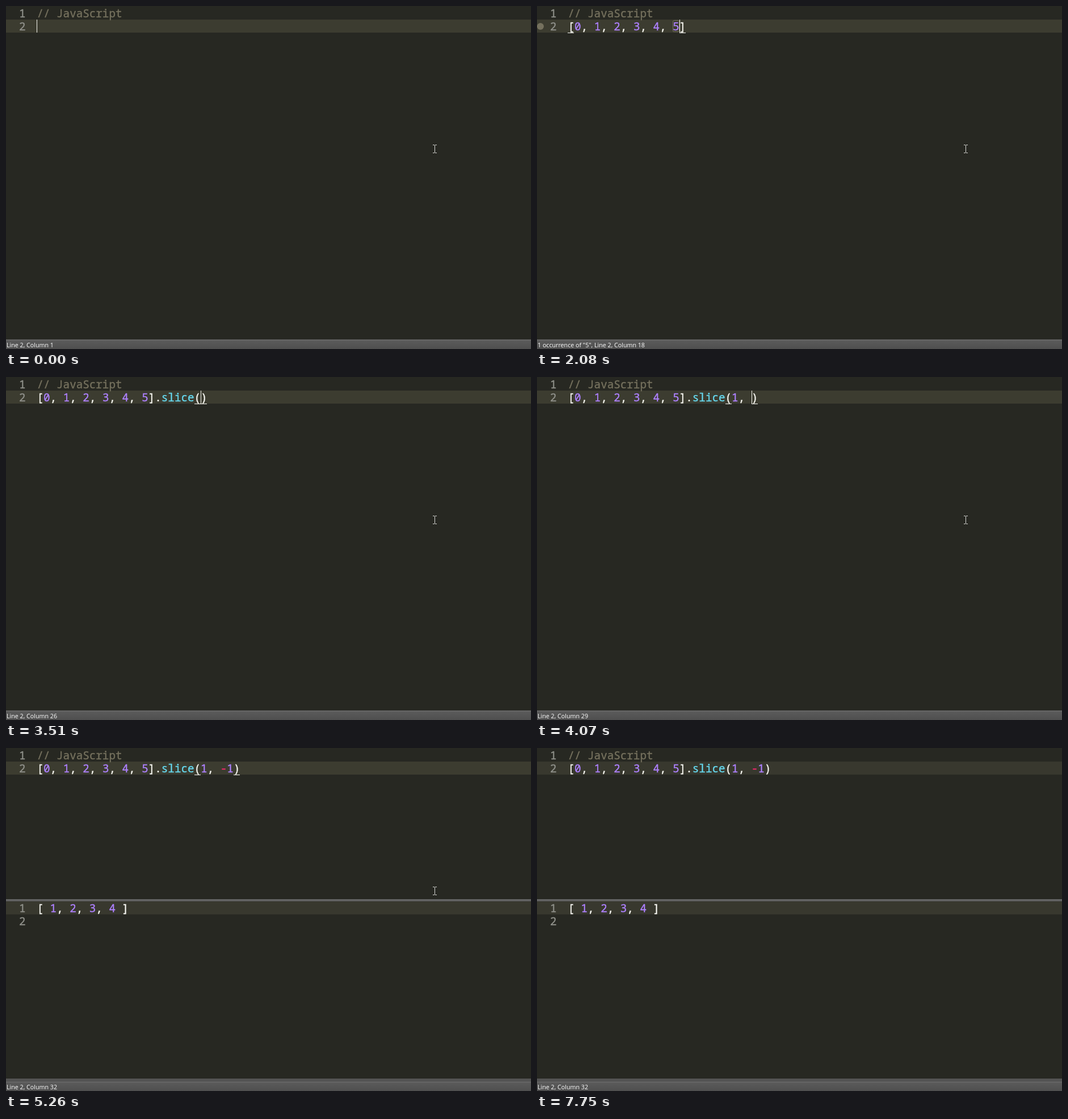
These frames come from a looping animation (925x606 px, 7810 ms). An HTML page with a canvas:

```html
<!DOCTYPE html>
<html lang="en">
<head>
<meta charset="utf-8">
<title>Array slice</title>
<style>
html, body { margin: 0; width: 100%; height: 100%; overflow: hidden; background: #272822; }
canvas { display: block; }
</style>
</head>
<body>
<canvas id="stage" width="925" height="606"></canvas>
<script>
const ctx = document.getElementById("stage").getContext("2d");
const LOOP = 7810;
const W = 925, LEFT = 54.45, CELL = 11.545, ROW = 23;
const CODE_FONT = '19.24px "Noto Sans Mono", monospace';
const STATUS_FONT = '10.7px "Open Sans", sans-serif';
const COLORS = {
  back: "#272822", line: "#3c3c30", dimLine: "#38382e", text: "#f8f8f2",
  number: "#ae81ff", minus: "#f92672", call: "#66d9ef", comment: "#75715e",
  gutter: "#8f908a"
};
const PANEL_AT = 5260, POINTER_GONE = 7050, UNFOCUS_AT = 7750;

// Each edit: time, text before the caret, text after it, highlighted word
const LIST = "[0, 1, 2, 3, 4, 5]";
const SLICE = LIST + ".slice(";
const edits = [
  [0, "", ""],
  [270, "[", "]"],
  [430, "[0", "]"],
  [850, "[0, ", "]"],
  [990, "[0, 1", "]"],
  [1120, "[0, 1, ", "]"],
  [1240, "[0, 1, 2", "]"],
  [1400, "[0, 1, 2, ", "]"],
  [1550, "[0, 1, 2, 3", "]"],
  [1700, "[0, 1, 2, 3, ", "]"],
  [1840, "[0, 1, 2, 3, 4", "]", "4"],
  [1960, "[0, 1, 2, 3, 4, ", "]"],
  [2080, "[0, 1, 2, 3, 4, 5", "]", "5"],
  [2360, LIST, ""],
  [2670, LIST + ".", ""],
  [2810, LIST + ".s", ""],
  [2950, LIST + ".sli", ""],
  [3090, LIST + ".slice", ""],
  [3230, LIST + ".slice", "", "slice"],
  [3510, SLICE, ")"],
  [3790, SLICE + "1", ")", "1"],
  [4070, SLICE + "1, ", ")"],
  [4340, SLICE + "1, -1", ")"],
  [4740, SLICE + "1, -1)", ""]
];

// Caret opacity from each time on
const blinks = [
  [0, 1], [5140, 0.7], [5260, 0], [5840, 0.5], [5960, 1],
  [6380, 0], [6900, 0.5], [7050, 1], [7480, 0.5], [7610, 0]
];

const latest = (steps, t) => steps.filter(step => step[0] <= t).pop();
const colX = col => LEFT + col * CELL;

function rect(x, y, w, h, color) {
  ctx.fillStyle = color;
  ctx.fillRect(x, y, w, h);
}

// A hairline outline gives the code its sturdier weight
function put(text, x, base, color) {
  ctx.fillStyle = ctx.strokeStyle = color;
  ctx.lineWidth = 0.4;
  ctx.fillText(text, x, base);
  ctx.strokeText(text, x, base);
}

function lineNumber(n, base) {
  put(n, 23, base, COLORS.gutter);
}

function drawCode(text, base) {
  for (const match of text.matchAll(/\d+|-|slice(?=\()|[^\d\s-]/g)) {
    const token = match[0];
    const kind = /\d/.test(token) ? "number"
      : token === "-" ? "minus"
      : token === "slice" ? "call" : "text";
    put(token, colX(match.index), base, COLORS[kind]);
  }
}

function underlineBrackets(text, caret) {
  for (const [open, close] of ["[]", "()"]) {
    const a = text.indexOf(open), b = text.indexOf(close);
    if (a < 0 || caret <= a || caret > b + 1) continue;
    for (const col of [a, b]) rect(Math.round(colX(col)), 47, 11, 1, COLORS.text);
  }
}

function highlight(text, word) {
  let count = 0;
  ctx.strokeStyle = COLORS.comment;
  ctx.lineWidth = 1;
  for (let i = text.indexOf(word); i >= 0; i = text.indexOf(word, i + 1)) {
    ctx.beginPath();
    ctx.roundRect(Math.round(colX(i)) + 0.5, 25.5, Math.round(word.length * CELL) - 1, 20, 2);
    ctx.stroke();
    count++;
  }
  ctx.fillStyle = COLORS.comment;
  ctx.beginPath();
  ctx.arc(6, 36, 6, 0, Math.PI * 2);
  ctx.fill();
  return `${count} occurrence${count > 1 ? "s" : ""} of "${word}", `;
}

function drawPointer() {
  const color = "#d8d8d4";
  rect(755, 246, 1, 13, color);
  for (const y of [245, 259]) {
    rect(752, y, 3, 1, color);
    rect(756, y, 3, 1, color);
  }
}

function drawPanel() {
  rect(0, 267, W, 4, "#5a5a5a");
  rect(0, 268, W, 1, "#707070");
  rect(0, 271, W, ROW, COLORS.dimLine);
  lineNumber(1, 290);
  lineNumber(2, 313);
  drawCode("[ 1, 2, 3, 4 ]", 290);
  rect(0, 584, W, 5, "#535353");
}

function drawStatus(label) {
  const shade = ctx.createLinearGradient(0, 589, 0, 606);
  shade.addColorStop(0, "#5c5c5c");
  shade.addColorStop(1, "#4f4f4f");
  rect(0, 589, W, 17, shade);
  rect(0, 590, W, 1, "#6a6a6a");
  ctx.font = STATUS_FONT;
  ctx.fillStyle = "#ffffff";
  ctx.fillText(label, 1, 603);
}

function draw(t) {
  const [, before, after, word] = latest(edits, t);
  const text = before + after, caret = before.length;
  const focused = t < UNFOCUS_AT;
  let label = `Line 2, Column ${caret + 1}`;

  rect(0, 0, W, 606, COLORS.back);
  rect(0, 24, W, ROW, focused ? COLORS.line : COLORS.dimLine);
  ctx.font = CODE_FONT;
  lineNumber(1, 20);
  lineNumber(2, 43);
  put("// JavaScript", LEFT, 20, COLORS.comment);
  if (word) label = highlight(text, word) + label;
  drawCode(text, 43);
  if (focused) underlineBrackets(text, caret);

  ctx.globalAlpha = latest(blinks, t)[1];
  rect(Math.round(colX(caret)), 24, 1, ROW, "#f8f8f0");
  ctx.globalAlpha = 1;

  if (t >= PANEL_AT) drawPanel();
  if (t < POINTER_GONE) drawPointer();
  drawStatus(label);
}

const start = performance.now();
function tick() {
  draw((performance.now() - start) % LOOP);
  requestAnimationFrame(tick);
}
tick();
</script>
</body>
</html>
```
